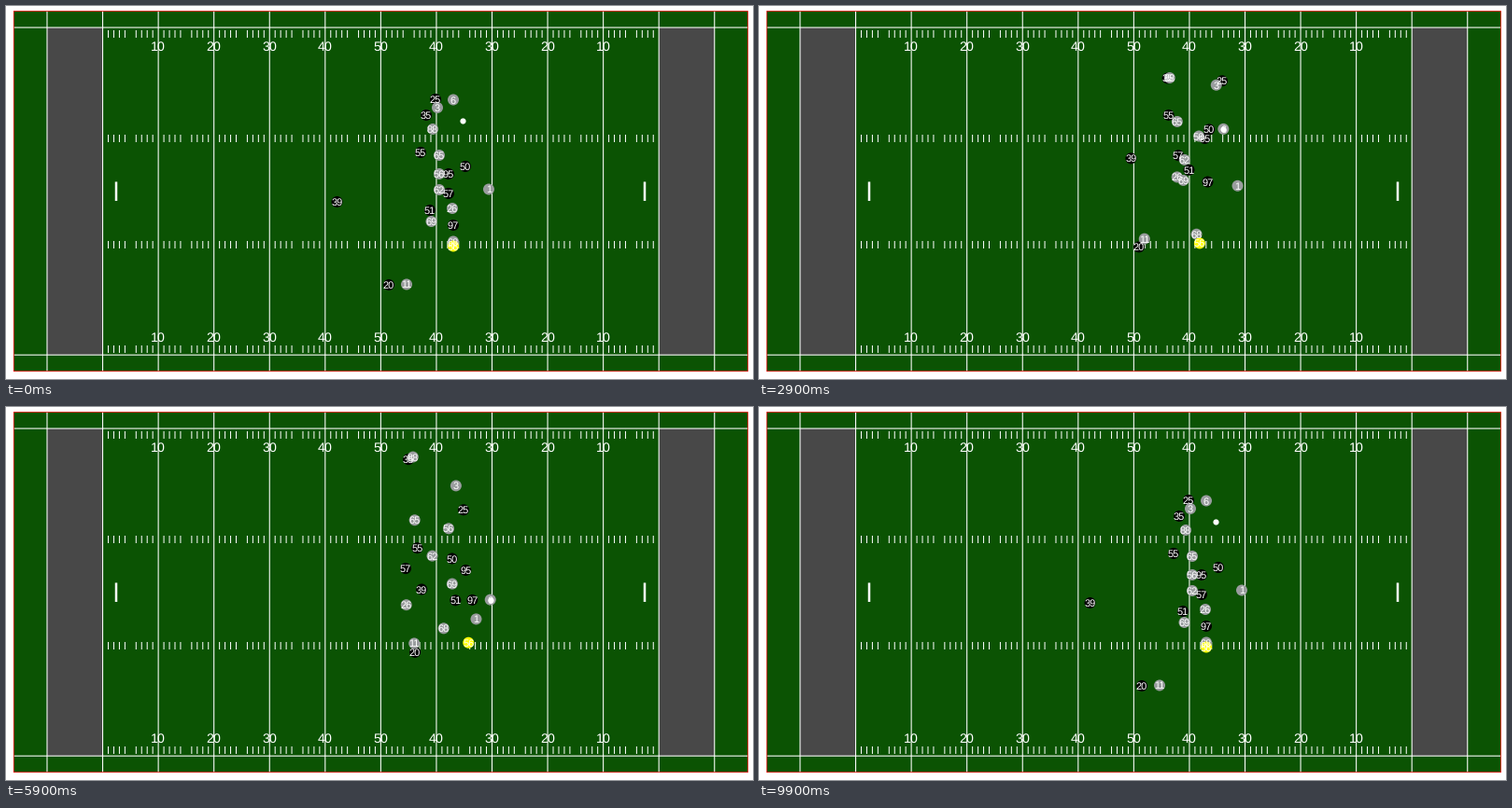
Recreate the animation shown at these times as a matplotlib script. Size 800 px wide and 400 px high, loop 10000 ms.

```python
import numpy as np
import matplotlib.pyplot as plt
from matplotlib.animation import FuncAnimation

W, H, DPI = 800, 400, 100
GRASS, ENDZONE, EDGE = "#0b5303", "#484848", "red"
DARK, LIGHT, MARKED = "black", "#999c9e", "#ffff00"

# the panel, with a 5% margin around a field of 120 by 53.3 yards
LEFT, RIGHT, TOP, BOTTOM = 8.25, 794.5, 5.5, 391.75
YARD = (RIGHT - LEFT) / 132
PAD = (BOTTOM - TOP) / 22
SIDELINES = (TOP + PAD, BOTTOM - PAD)

FRAMES, LAST_STEP = 100, 87
HOLDS = np.array([17, 31, 33, 64, 67, 69, 71, 76, 81, 83, 98])  # repeated poses
CATCH = 2
BALL_START = np.array([488.5, 123])
LABEL = 11

plt.rcParams["font.family"] = "Liberation Sans"
plt.rcParams["text.hinting"] = "none"


def pt(px):
    return px * 72 / DPI


def yard_x(yard):
    return LEFT + YARD * (yard + 6)


def centred(ax, x, y, text, size, z):
    return ax.text(x, y + 0.358 * size, text, color="white", fontsize=pt(size),
                   ha="center", va="baseline", zorder=z)


def box(ax, x0, x1, y0, y1, **style):
    ax.add_patch(plt.Rectangle((x0, y0), x1 - x0, y1 - y0, snap=False, **style))


def stripes(ax, xs, y0, y1, width=1.07):
    ax.vlines(xs, y0, y1, color="white", lw=pt(width), snap=False, zorder=2)


def draw_field(ax):
    box(ax, LEFT, RIGHT, TOP, BOTTOM, fc=GRASS, lw=0, zorder=1)
    for yard in (0, 110):
        box(ax, yard_x(yard), yard_x(yard + 10), *SIDELINES, fc=ENDZONE, lw=0, zorder=1)
    box(ax, LEFT, RIGHT, TOP, BOTTOM, fc="none", ec=EDGE, lw=pt(0.7), zorder=3)
    stripes(ax, yard_x(np.arange(0, 121, 10)), TOP, BOTTOM)
    ax.hlines(SIDELINES, LEFT, RIGHT, color="white", lw=pt(1.07), snap=False, zorder=2)
    marks = [yard_x(y) for y in range(11, 110) if y % 5]
    for y in (30, 142, 256, 368):
        stripes(ax, marks, y - 4, y + 4, 1)
    stripes(ax, [118, 684], 188.5, 209, 2.5)
    for yard in range(20, 101, 10):
        for y in (43, 355):
            centred(ax, yard_x(yard), y, str(50 - abs(yard - 60)), 14.2, 3)


def ease(step):
    """Share of the run covered: gathers pace early, slows at the end."""
    u = step / LAST_STEP
    return u - (0.0425 + 0.051 * u) * np.sin(2 * np.pi * u)


class Player:
    """Runs a smooth curve through points spread evenly over the eased play."""

    def __init__(self, number, color, *points):
        self.number, self.color = number, color
        n = len(points)
        self.curve = np.polyfit(np.linspace(0, 1, n), points, n - 1)

    def at(self, step):
        u = ease(step)
        pos = np.zeros(2)
        for term in self.curve:
            pos = pos * u + term
        return pos


carrier = Player("6", LIGHT, (479, 100.5), (510, 168), (527.5, 275))
players = [
    Player("25", DARK, (460, 100), (498, 80), (491, 105), (497, 172)),
    Player("35", DARK, (450, 117), (432, 59.5), (436, 72)),
    Player("55", DARK, (444, 157), (438, 120), (449, 245)),
    Player("50", DARK, (492, 172), (478, 134), (483, 250)),
    Player("95", DARK, (474, 180), (484, 145), (509, 265)),
    Player("57", DARK, (474, 201), (435, 155), (427, 238)),
    Player("51", DARK, (454, 219), (470, 177), (503, 301)),
    Player("97", DARK, (479, 235), (488, 184), (524, 286)),
    Player("39", DARK, (354.5, 210), (427, 164), (460, 294)),
    Player("20", DARK, (410, 299), (418, 250), (485, 316)),
    carrier,
    Player("3", LIGHT, (462, 109), (491, 82), (483, 83), (485, 103)),
    Player("88", LIGHT, (457, 132), (434, 54.5), (450, 84)),
    Player("65", LIGHT, (464, 160), (440, 114), (442, 159)),
    Player("56", LIGHT, (464, 180), (474, 126), (470, 164)),
    Player("62", LIGHT, (464, 197), (454, 155), (467, 189)),
    Player("1", LIGHT, (517, 196.5), (508, 205), (496, 280)),
    Player("26", LIGHT, (478, 217), (433, 186), (437, 291)),
    Player("69", LIGHT, (455.5, 231), (463, 177), (512, 244)),
    Player("68", LIGHT, (479, 252.5), (466, 240), (481, 236)),
    Player("11", LIGHT, (429, 298.5), (418, 239), (490, 315)),
    Player("56", MARKED, (479, 257.5), (479, 253), (536, 254)),
]

fig = plt.figure(figsize=(W / DPI, H / DPI), dpi=DPI, facecolor="white")
ax = fig.add_axes([0, 0, 1, 1])
ax.axis("off")
draw_field(ax)
ax.set(xlim=(0, W), ylim=(H, 0))

dots = ax.scatter(*np.zeros((2, len(players))), s=pt(12) ** 2,
                  c=[p.color for p in players], linewidths=0, zorder=4)
labels = [centred(ax, 0, 0, p.number, LABEL, 5) for p in players]
ball = ax.scatter(*BALL_START, s=pt(6.2) ** 2, c="white", linewidths=0, zorder=6)


def update(n):
    step = 0 if n == FRAMES - 1 else n - np.sum(HOLDS <= n)
    spots = np.array([p.at(step) for p in players])
    dots.set_offsets(spots)
    for label, (x, y) in zip(labels, spots):
        label.set_position((x, y + 0.358 * LABEL))
    # the pass flies to the receiver, who then carries it
    flight = min(step / CATCH, 1)
    ball.set_offsets([BALL_START + flight * (carrier.at(step) - BALL_START)])
    return [dots, ball, *labels]


anim = FuncAnimation(fig, update, frames=FRAMES, interval=100,
                     init_func=lambda: update(0), repeat=True, repeat_delay=0)
plt.show()
```
